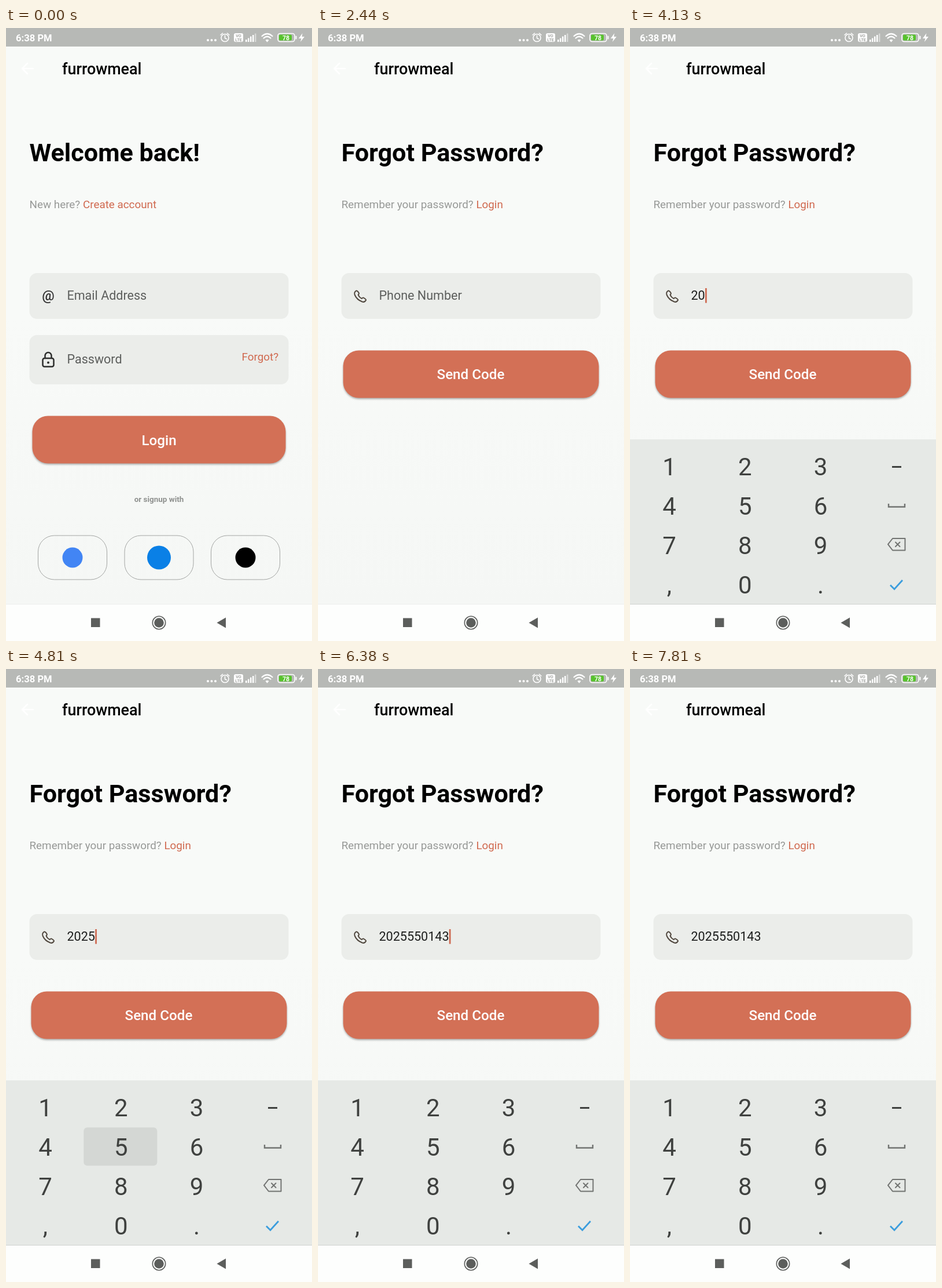
These frames come from a looping animation (529x1058 px, 8000 ms). An HTML page:

```html
<!DOCTYPE html>
<html lang="en">
<head>
<meta charset="utf-8">
<title>Password reset</title>
<style>
  html, body { margin: 0; width: 100%; height: 100%; overflow: hidden; background: #f7f9f7; }
  svg { display: block; font-family: Roboto, sans-serif; }
  .brand { font-size: 26.9px; font-weight: 500; }
  .title { font-size: 43.1px; font-weight: 700; }
  .sub { font-size: 18.85px; fill: #979997; }
  .link { font-size: 18.85px; fill: #d0694f; }
  .field { fill: #ebedea; }
  .hint { font-size: 21.54px; fill: #5c5e5c; }
  .btn { fill: #d37056; filter: drop-shadow(0 2px 1.5px rgba(0, 0, 0, .3)); }
  .label { font-size: 24.2px; font-weight: 500; fill: #fff; text-anchor: middle; }
  .key { font-size: 42px; fill: #3f413f; text-anchor: middle; }
  .line { fill: none; stroke-linecap: round; stroke-linejoin: round; }
</style>
</head>
<body>
<svg width="529" height="1058" viewBox="0 0 529 1058">
  <defs>
    <linearGradient id="bg" x2="0" y2="1">
      <stop offset=".5" stop-color="#f8faf8"/>
      <stop offset="1" stop-color="#f5f7f5"/>
    </linearGradient>
    <clipPath id="app"><rect width="529" height="995"/></clipPath>
    <g id="header">
      <rect width="529" height="995" fill="url(#bg)"/>
      <path class="line" d="M47 70H29M37 61L28 70L37 79" stroke="#fff" stroke-width="2.6"/>
      <text class="brand" x="97" y="80">furrowmeal</text>
    </g>
  </defs>

  <g clip-path="url(#app)">
    <g id="login">
      <use href="#header"/>
      <text class="title" x="40.5" y="230">Welcome back!</text>
      <text class="sub" x="40.5" y="311">New here? <tspan class="link">Create account</tspan></text>
      <rect class="field" x="40.5" y="423" width="448" height="79" rx="13"/>
      <text x="73" y="469.5" font-size="24" font-weight="500" fill="#333" text-anchor="middle">@</text>
      <text class="hint" x="105.5" y="469">Email Address</text>
      <rect class="field" x="40.5" y="530" width="448" height="85" rx="13"/>
      <g class="line" stroke="#2d2e2d" stroke-width="2.5">
        <rect x="63.5" y="570" width="19" height="14.5" rx="3"/>
        <path d="M67.5 570V565.5A5.5 5.5 0 0 1 78.5 565.5V570"/>
      </g>
      <circle cx="73" cy="577.5" r="2" fill="#2d2e2d"/>
      <text class="hint" x="105.5" y="578.5">Password</text>
      <text class="link" x="407.5" y="574">Forgot?</text>
      <rect class="btn" x="45.5" y="669.5" width="438" height="82" rx="27"/>
      <text class="label" x="264.5" y="719.5">Login</text>
      <text x="264.5" y="817.5" font-size="13.46" font-weight="700" fill="#8f918f" text-anchor="middle">or signup with</text>
      <g fill="none" stroke="#a3a5a3">
        <rect x="55.5" y="876" width="119" height="76" rx="28"/>
        <rect x="205" y="876" width="119" height="76" rx="28"/>
        <rect x="354.5" y="876" width="119" height="76" rx="28"/>
      </g>
      <circle cx="115" cy="914" r="17.5" fill="#4285f4"/>
      <circle cx="264.5" cy="914" r="20.5" fill="#0a80e6"/>
      <circle cx="414" cy="914" r="17.5"/>
    </g>

    <g id="forgot">
      <use href="#header"/>
      <text class="title" x="40.5" y="230">Forgot Password?</text>
      <text class="sub" x="40.5" y="311">Remember your password? <tspan class="link">Login</tspan></text>
      <rect class="field" x="40.5" y="423" width="448" height="79" rx="13"/>
      <path class="line" stroke="#51483f" stroke-width="2"
        d="M66 453.5Q62 456 63.5 460.5Q67 469 76.5 472.5Q80.5 474 83 469.5Q83 468 78.5 465.5Q77.500 465 75.500 467Q71 464.500 69.500 460.500Q71.500 458.500 70.500 457Q68 453 66 453.500Z"/>
      <text class="hint" id="phone" x="105.5" y="469"></text>
      <rect id="caret" y="449" width="2.8" height="25.5" fill="#cf6d55"/>
      <rect class="btn" x="43.5" y="556.5" width="442" height="82" rx="27"/>
      <text class="label" x="264" y="606">Send Code</text>
    </g>

    <g id="pad">
      <rect y="710" width="529" height="285" fill="#e6e9e6"/>
      <rect id="press" width="127" height="66" rx="6" fill="#000" opacity=".08"/>
      <g id="keys"></g>
      <g class="line" stroke="#727472" stroke-width="2.4">
        <path d="M453 757.500H469" stroke="#3f413f" stroke-width="3" stroke-linecap="butt"/>
        <path d="M447 821V826.500H475V821" stroke-linecap="butt" stroke-linejoin="miter"/>
        <path d="M454 881H475.500V901.500H454L446 891.200ZM459 887.500L466.500 895M466.500 887.500L459 895" stroke-width="2"/>
        <path d="M450 961.500L457 968.500L471 953" stroke="#3b9ddd" stroke-width="2.8" stroke-linecap="butt" stroke-linejoin="miter"/>
      </g>
    </g>
  </g>

  <rect width="529" height="32" fill="#b7b9b6"/>
  <text x="17" y="22.500" font-size="16.6" font-weight="700" fill="#fff">6:38 PM</text>
  <g fill="#fff">
    <circle cx="349" cy="21" r="2"/><circle cx="355.500" cy="21" r="2"/><circle cx="362" cy="21" r="2"/>
    <rect x="394" y="9" width="16" height="15" rx="3"/>
    <path d="M414 20h2.500v4h-2.500zM418 17.500h2.500v6.500h-2.500zM422 14.500h2.500v9.500h-2.500zM426 12h2.500v12h-2.500z"/>
    <path d="M430 9.500h2.500v14.500h-2.500z" opacity=".45"/>
    <path d="M512.500 9L506 18H510.500L509 24L516 15H511.500Z"/>
    <rect x="500.500" y="13.500" width="2" height="6" rx="1"/>
    <path d="M448.500 21Q451.500 18.500 454.500 21L451.500 24.500Z"/>
    <g id="signal"><path d="M457 20.500l2-2.500l2 2.500zM457 22l2 2.500l2-2.500z"/></g>
  </g>
  <g class="line" stroke="#fff" stroke-width="1.6">
    <circle cx="378.500" cy="17" r="6.500"/>
    <path d="M378.500 13V17.500L381.500 19M371 12L374.500 9M386 12L382.500 9"/>
    <path d="M442.500 14Q451.500 6 460.500 14M445.500 17.500Q451.500 12 457.500 17.500" stroke-width="2.2"/>
    <rect x="470" y="9.500" width="29" height="14" rx="4"/>
  </g>
  <rect x="472" y="11.500" width="22" height="10" rx="2" fill="#57c22d"/>
  <g fill="#fff" font-weight="700" text-anchor="middle">
    <text x="484" y="20.500" font-size="10.500">78</text>
    <g fill="#a4a6a3" font-size="7">
      <text x="402" y="16">VO</text>
      <text x="402" y="22.500">LTE</text>
    </g>
  </g>

  <rect y="994" width="529" height="64" fill="#fdfefd"/>
  <path id="edge" d="M0 994.500H529" stroke="#eceeec"/>
  <g fill="#5c5e5c">
    <rect x="147" y="1018.500" width="15.500" height="15.500"/>
    <circle cx="264.500" cy="1026.500" r="8.300"/>
    <circle cx="264.500" cy="1026.500" r="11.200" fill="none" stroke="#5c5e5c" stroke-width="1.600"/>
    <path d="M364.500 1026.500L380 1017.500V1035.500Z"/>
  </g>
</svg>

<script>
const LOOP = 8000, STEP = 62.5, BLINK = 500, DIGIT_W = 12.09;
const NUMBER = '2025550143';
const TYPED = [3625, 4000, 4437, 4812, 5062, 5375, 5687, 5937, 6125, 6310];
const KEYS = ['123', '456', '789', ',0.'];
const PAGE = [1875, 2125], PAD = [2815, 3125], FOCUS = 2685, FIRST_OFF = 3125;

const $ = id => document.getElementById(id);
const login = $('login'), forgot = $('forgot'), phone = $('phone'), caret = $('caret');
const pad = $('pad'), press = $('press'), edge = $('edge'), signal = $('signal');

KEYS.forEach((row, r) => [...row].forEach((ch, c) => {
  const key = document.createElementNS('http://www.w3.org/2000/svg', 'text');
  key.setAttribute('class', 'key');
  key.setAttribute('x', 68 + c * 130.8);
  key.setAttribute('y', 771.5 + r * 68.3);
  key.textContent = ch;
  $('keys').append(key);
}));

const show = (el, on) => el.setAttribute('visibility', on ? 'inherit' : 'hidden');
const shift = (el, x, y) => el.setAttribute('transform', `translate(${x} ${y})`);
const progress = (t, [from, to]) => Math.min(1, Math.max(0, (t - from) / (to - from)));
const easeOut = p => 1 - (1 - p) ** 3;

function caretOn(t, count) {
  if (t < FOCUS) return false;
  if (!count) return t < FIRST_OFF;
  return Math.floor((t - TYPED[count - 1]) / BLINK) % 2 === 0;
}

function drawPress(t) {
  const i = TYPED.findIndex(at => t >= at - 130 && t < at + 60);
  show(press, i >= 0);
  if (i < 0) return;
  const row = KEYS.findIndex(keys => keys.includes(NUMBER[i]));
  const col = KEYS[row].indexOf(NUMBER[i]);
  shift(press, 3.5 + col * 130.8, 723 + row * 68.3);
}

function draw(time) {
  const t = Math.floor((time + 3) / STEP) * STEP;

  const page = progress(t, PAGE);
  show(login, page < 1);
  show(forgot, page > 0);
  forgot.setAttribute('opacity', page ** 1.7);
  shift(forgot, 0, 248 * (1 - easeOut(page)));

  const up = progress(t, PAD);
  show(pad, up > 0);
  shift(pad, 0, 285 * (1 - easeOut(up)));
  edge.setAttribute('stroke', up > 0 ? '#cfd1cf' : '#eceeec');

  const count = TYPED.filter(at => t >= at).length;
  phone.textContent = count ? NUMBER.slice(0, count) : 'Phone Number';
  phone.style.fill = count ? '#1d1e1d' : '#5c5e5c';
  caret.setAttribute('x', 105.8 + count * DIGIT_W);
  show(caret, page > 0 && caretOn(t, count));
  drawPress(t);
  show(signal, t >= 7800);
}

const start = performance.now();
function tick(now) {
  draw(Math.max(0, now - start) % LOOP);
  requestAnimationFrame(tick);
}
draw(0);
requestAnimationFrame(tick);
</script>
</body>
</html>
```
